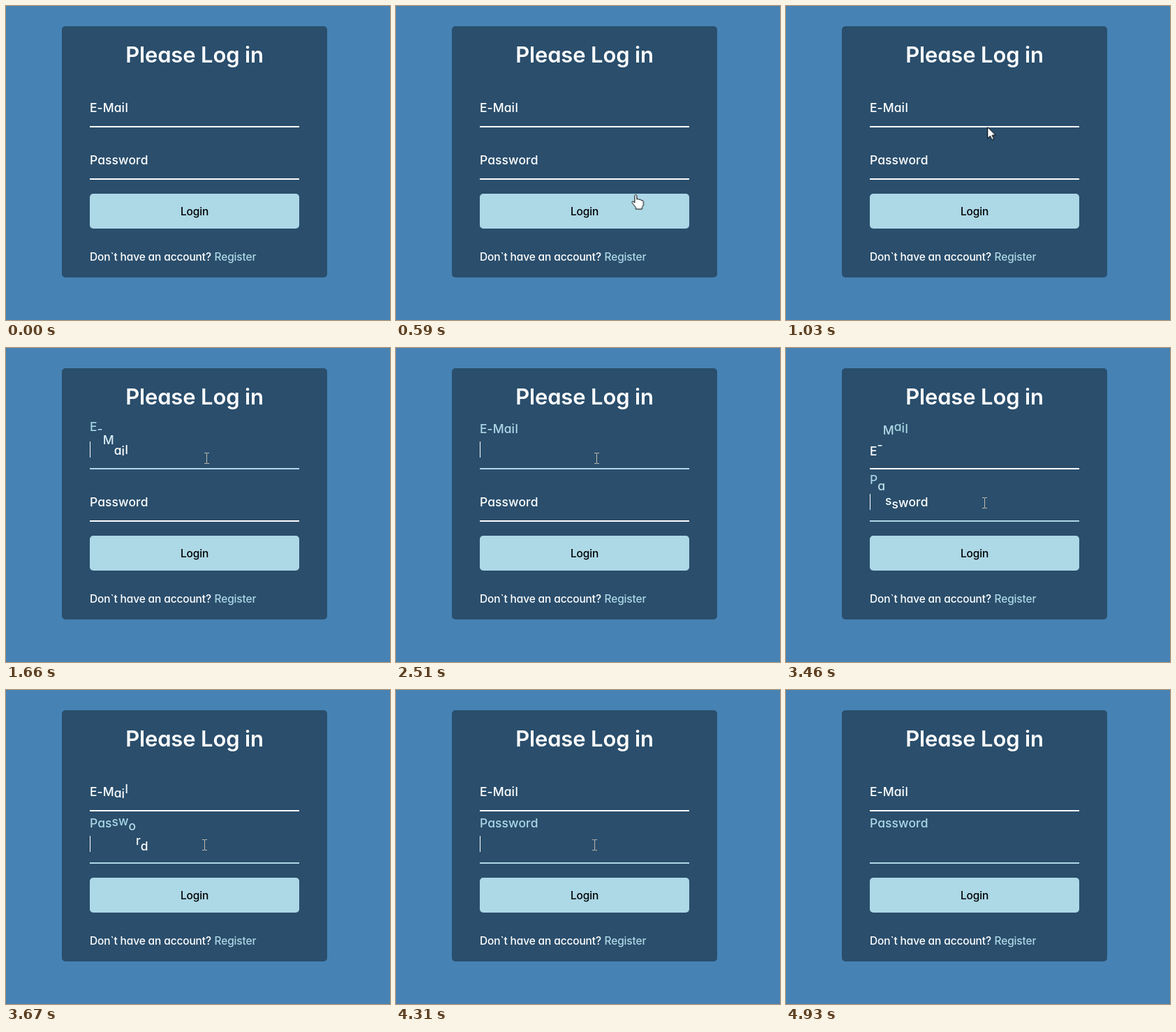
An HTML page for the animation above (5.3 s loop, 550x450 px).

```html
<!DOCTYPE html>
<html lang="en">
<head>
<meta charset="utf-8">
<title>Login form</title>
<style>
  html, body { margin: 0; width: 100%; height: 100%; overflow: hidden; background: steelblue; }
  svg { display: block; width: 550px; height: 450px; }
  text {
    font: 500 15.5px Inter, Lato, sans-serif;
    font-feature-settings: "cv11";
    font-optical-sizing: none;
    letter-spacing: -.15px;
    fill: #fff;
  }
  .title { font-size: 31px; font-weight: 600; text-anchor: middle; }
  .button { text-anchor: middle; fill: #000; }
  .link { fill: lightblue; }
  .label text { font-size: 17.5px; letter-spacing: 0; }
  .line, .caret { fill: #fff; }
  .caret, #cursor, #cursor > * { opacity: 0; }
</style>
</head>
<body>
<svg viewBox="0 0 550 450">
  <rect width="550" height="450" fill="steelblue"/>
  <rect x="80" y="29" width="380" height="360" rx="5" fill="#2a4e6c"/>
  <text class="title" x="270" y="81">Please Log in</text>

  <g id="email" transform="translate(120 119)">
    <rect class="line" y="53" width="300" height="2"/>
    <g class="label"></g>
    <rect class="caret" y="15" width="1" height="23"/>
  </g>
  <g id="pass" transform="translate(120 194)">
    <rect class="line" y="53" width="300" height="2"/>
    <g class="label"></g>
    <rect class="caret" y="15" width="1" height="23"/>
  </g>

  <rect x="120" y="269" width="300" height="50" rx="5" fill="lightblue"/>
  <text class="button" x="270" y="300">Login</text>
  <text x="120" y="365">Don`t have an account?</text>
  <text class="link" x="298.5" y="365">Register</text>

  <g id="cursor">
    <path id="arrow" d="M.5 .5V16.5L4.2 13L6.8 18.6L9.4 17.5L6.9 12H11.8Z" fill="#fff" stroke="#000"/>
    <path id="beam" d="M-3 -7.5H0L.5 -7L1 -7.5H4M.5 -7V7M-3 7.5H0L.5 7L1 7.5H4" fill="none" stroke="#c4bab0"/>
    <path id="hand" d="M-1.5 12V1.5Q0 -1 1.5 1.5V7Q3.5 5.5 4.8 7.5Q7 6.5 8 8.5Q10.5 8 11 10.5V15L9 18.5V21H0V18.5L-5.5 11.5Q-5 9 -3 10.3Z" fill="#fff" stroke="#000"/>
  </g>
</svg>
<script>
const LOOP = 5300, BLINK = 550, STEP = 20;
const WAVE = 'cubic-bezier(.68, -.55, .265, 1.55)';
const $ = selector => document.querySelector(selector);

// rows: [ms, properties, easing towards the next row]
function play(el, rows, easing = 'linear') {
  const frames = rows.map(([ms, props, ease = easing]) => ({ ...props, offset: ms / LOOP, easing: ease }));
  frames.push({ ...rows[rows.length - 1][1], offset: 1 });
  el.animate(frames, { duration: LOOP, iterations: Infinity });
}

// steps: [ms, value], each value held until the next
function hold(el, prop, steps) {
  play(el, steps.map(([ms, value]) => [ms, { [prop]: value }]), 'step-end');
}

// Letters rise and fall one after another, 50 ms apart
function wave(parent, word, starts) {
  const states = [
    { transform: 'translateY(0px)', fill: '#fff' },
    { transform: 'translateY(-30px)', fill: 'lightblue' }
  ];
  let x = 0;
  [...word].forEach((char, i) => {
    const t = document.createElementNS('http://www.w3.org/2000/svg', 'text');
    t.textContent = char;
    t.setAttribute('x', x);
    t.setAttribute('y', 33);
    parent.append(t);
    x += Math.max(5, t.getComputedTextLength());

    const rows = [[0, states[0]]];
    starts.forEach((start, n) => {
      const ms = start + 50 * i;
      rows.push([ms, states[n % 2], WAVE], [ms + 300, states[(n + 1) % 2]]);
    });
    play(t, rows);
  });
}

function field(id, word, focus, blur, starts) {
  wave($(id + ' .label'), word, starts);
  hold($(id + ' .line'), 'fill', [[0, '#fff'], [focus, 'lightblue'], [blur, '#fff']]);
  const blinks = [[0, 0]];
  for (let ms = focus, on = 1; ms < blur; ms += BLINK, on = 1 - on) blinks.push([ms, on]);
  hold($(id + ' .caret'), 'opacity', [...blinks, [blur, 0]]);
}

field('#email', 'E-Mail', 1410, 3200, [1420, 3250]);
field('#pass', 'Password', 3200, LOOP, [3250]);

// The pointer eases between its stops: [ms, x, y]
const stops = [
  [350, 448, 421], [745, 290, 193], [1270, 287, 158], [2510, 287, 158],
  [2960, 284, 222], [4310, 284, 222], [4850, 469, 441]
];

function pointer(ms) {
  const n = stops.findIndex(stop => stop[0] > ms);
  if (n < 1) return (n ? stops[stops.length - 1] : stops[0]).slice(1);
  const [a, b] = [stops[n - 1], stops[n]];
  const p = (ms - a[0]) / (b[0] - a[0]);
  const ease = p * p * (3 - 2 * p);
  return [1, 2].map(k => a[k] + (b[k] - a[k]) * ease);
}

function shape([x, y]) {
  const inside = (top, height) => x > 120 && x < 420 && y > top && y < top + height;
  if (inside(269, 50)) return 'hand';
  return inside(119, 55) || inside(194, 55) ? 'beam' : 'arrow';
}

const track = Array.from({ length: LOOP / STEP }, (_, i) => [i * STEP, pointer(i * STEP)]);
play($('#cursor'), track.map(([ms, [x, y]]) => [ms, { transform: `translate(${x}px, ${y}px)` }]));
hold($('#cursor'), 'opacity', [[0, 0], [350, 1], [4930, 0]]);
for (const id of ['arrow', 'beam', 'hand']) {
  hold($('#' + id), 'opacity', track.map(([ms, at]) => [ms, shape(at) === id ? 1 : 0]));
}
</script>
</body>
</html>
```
